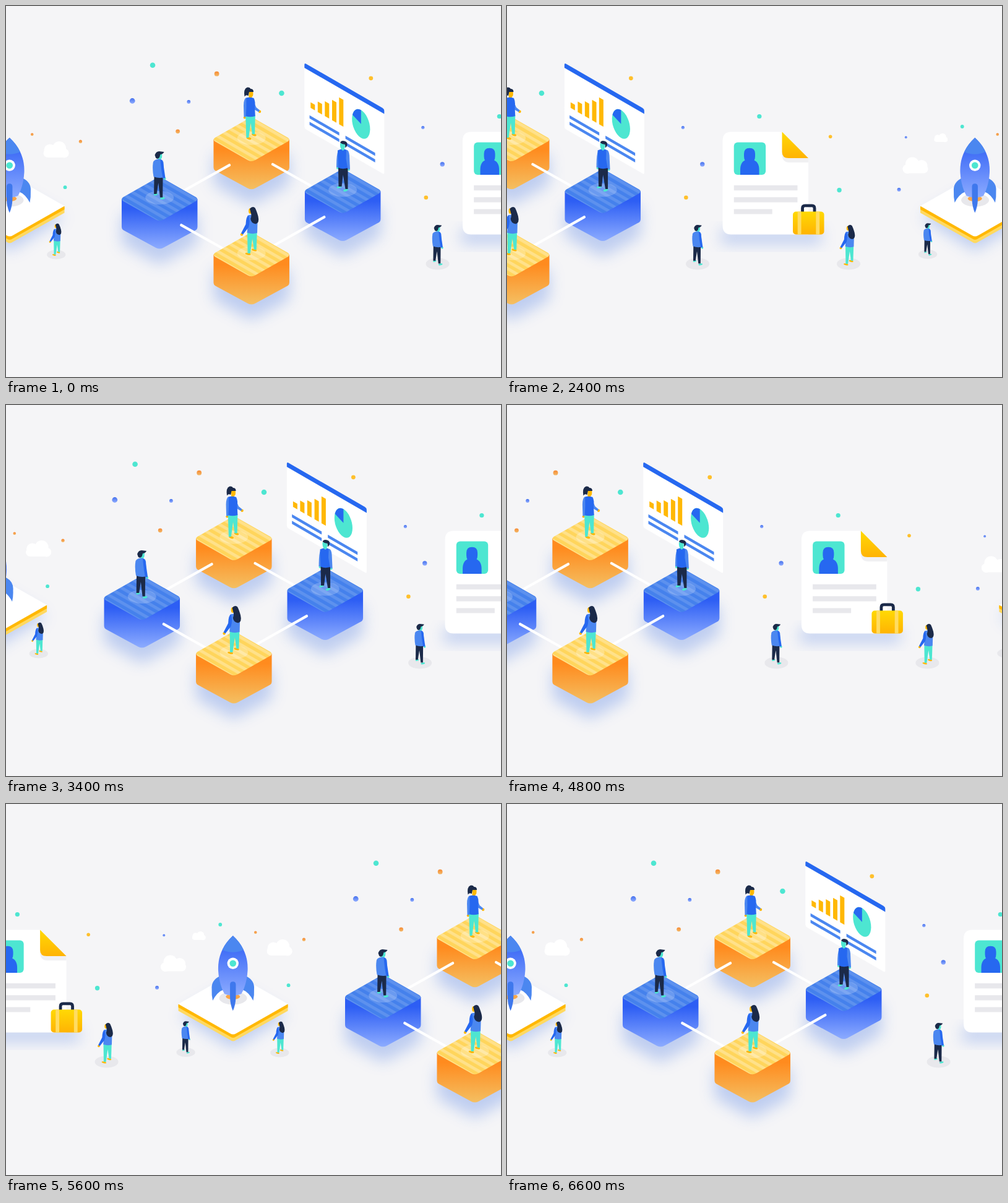
These frames come from a looping animation (800 px wide and 600 px high, 7600 ms). An HTML page:

```html
<!DOCTYPE html>
<html lang="en">
<head>
<meta charset="utf-8">
<title>Sliding isometric strip</title>
<style>
  html, body { margin: 0; width: 100%; height: 100%; overflow: hidden; background: #f5f5f7; }
  svg { display: block; width: 100%; height: 100%; }
  .blue { fill: #2668f0; }
  .sky { fill: #4b87f0; }
  .teal { fill: #4de6d1; }
  .navy { fill: #1b2a49; }
  .gold { fill: #ffb804; }
  .white { fill: #fff; }
  .grey { fill: #e8e8ec; }
  .link { stroke: #fff; stroke-width: 4.2; stroke-linecap: round; }
  .shadow { fill: #5d87e4; opacity: .36; }
</style>
</head>
<body>
<svg viewBox="0 0 800 600">
<defs>
  <linearGradient id="blueFade" x2="0" y2="1"><stop stop-color="#2a5bf4"/><stop offset="1" stop-color="#8cabff"/></linearGradient>
  <linearGradient id="cubeBlue" x2="0" y2="1"><stop offset=".2" stop-color="#2d5ef4"/><stop offset="1" stop-color="#8cabff"/></linearGradient>
  <linearGradient id="cubeOrange" x2="0" y2="1"><stop offset=".2" stop-color="#ff8b1e"/><stop offset="1" stop-color="#f4bf62"/></linearGradient>
  <linearGradient id="dotBlue" x2="0" y2="1"><stop stop-color="#4672ee"/><stop offset="1" stop-color="#91adff"/></linearGradient>
  <linearGradient id="dotOrange" x2="0" y2="1"><stop stop-color="#f78a33"/><stop offset="1" stop-color="#f3b969"/></linearGradient>
  <linearGradient id="yellow" x2="0" y2="1"><stop stop-color="#ffd904"/><stop offset="1" stop-color="#ffb304"/></linearGradient>
  <pattern id="stripes" width="20" height="11.8" patternUnits="userSpaceOnUse" patternTransform="skewY(30)">
    <rect width="20" height="5.6" fill="#fff"/>
  </pattern>
  <filter id="blur" x="-60%" y="-60%" width="220%" height="220%"><feGaussianBlur stdDeviation="12"/></filter>

  <path id="cubeTop" d="M-59-2.8L-5-33.5Q0-36.5 5-33.5L59-2.8Q63 .3 59 3.4L6 33.5Q0 37 -6 33.5L-59 3.4Q-63 .3 -59-2.8Z"/>
  <path id="cubeBody" d="M-61.25 0V45Q-61.25 49 -58 50.8L-6 79Q0 82 6 79L58 50.8Q61.25 49 61.25 45V0Z"/>
  <g id="cubeShadow" class="shadow" filter="url(#blur)"><use href="#cubeBody" y="24"/></g>
  <g id="cubeLid">
    <use href="#cubeTop"/>
    <use href="#cubeTop" style="fill:url(#stripes)" opacity=".17"/>
  </g>
  <g id="blueCube">
    <use href="#cubeShadow"/>
    <use href="#cubeBody" fill="url(#cubeBlue)"/>
    <use href="#cubeTop" fill="#4581ec"/>
    <use href="#cubeTop" fill="url(#stripes)" opacity=".13"/>
    <ellipse cy="-2" rx="23" ry="11" fill="#fff" opacity=".2"/>
  </g>
  <g id="orangeCube">
    <use href="#cubeShadow"/>
    <use href="#cubeBody" fill="url(#cubeOrange)"/>
    <use href="#cubeTop" fill="#ffd55c"/>
    <use href="#cubeTop" fill="url(#stripes)" opacity=".28"/>
    <ellipse cy="-2" rx="23" ry="11" fill="#fff" opacity=".25"/>
  </g>

  <!-- People stand with the origin at the centre of their ground spot -->
  <ellipse id="ground" rx="22.6" ry="11.3" class="grey"/>
  <g id="man">
    <g class="teal">
      <ellipse cx="-5.5" cy="-5.3" rx="3.4" ry="1.6" transform="rotate(-15 -5.5 -5.3)"/>
      <ellipse cx="5.5" cy="1" rx="4" ry="1.7" transform="rotate(-12 5.5 1)"/>
      <path d="M0-71H4.5Q5.5-64 2.5-62L1-59H-3Z"/>
      <circle cx="9" cy="-31" r="2"/>
    </g>
    <path class="navy" d="M-8-36L6-34L5.7-.5H1.5L-1.2-24L-4-6H-8.4Z"/>
    <path class="sky" d="M-9.5-58Q-7-62.5 0-62.5Q6-62 7-57L8-33Q0-30.5 -9-34Q-11.5-48 -9.5-58Z"/>
    <path class="blue" d="M2-61.8Q5.5-61.5 6.5-56L10-32L6.2-31Q3-45 2-61.8Z"/>
    <path class="navy" d="M-7-69Q-5-75 0-75L8-74Q6-70 2-70L.5-65Q-3-61.5 -5.5-64.5Z"/>
  </g>
  <g id="woman">
    <g class="gold">
      <ellipse cx="-5" cy="1" rx="4.5" ry="1.7" transform="rotate(12 -5 1)"/>
      <ellipse cx="5" cy="-5.3" rx="4.2" ry="1.7" transform="rotate(15 5 -5.3)"/>
      <ellipse cx="-1.2" cy="-68.5" rx="2.7" ry="4.5"/>
      <circle cx="-15" cy="-30.5" r="2.2"/>
    </g>
    <path class="teal" d="M-6-34H9.7L8.8-6H4.8L2.2-24L-1.2 0H-5.5Z"/>
    <path class="sky" d="M-5.5-61Q0-63.5 5-61L10.5-50L10-33Q2-30.5 -6.5-33.5L-5-47Z"/>
    <path class="blue" d="M-4-61.5Q-8-60 -8.5-47L-16-32.5L-13-30.5L-4-42Q-1-52 -4-61.5Z"/>
    <path class="navy" d="M-2-72Q2-77 6.5-73.5Q9-69 11.5-60Q14-49 7.5-47.5Q0-48.5 -.8-56Q1.5-61 -.5-66Z"/>
  </g>
  <g id="presenter">
    <g class="gold">
      <ellipse cx="-4" cy="1" rx="4" ry="1.8" transform="rotate(18 -4 1)"/>
      <ellipse cx="4.3" cy="-4.7" rx="4" ry="1.8" transform="rotate(18 4.3 -4.7)"/>
      <path d="M-4-76H2.5Q4-67 .8-66V-61H-4Z"/>
      <circle cx="-10.7" cy="-32.5" r="2.1"/><circle cx="13.5" cy="-42.3" r="2.2"/>
    </g>
    <path class="teal" d="M-9.3-36H6.3L5.6-5.5H1.4L-1-24L-4.2 0H-8.2Z"/>
    <path class="sky" d="M4-58L8-49L13.5-44.5L12-41.5L4-46Z"/>
    <path class="blue" d="M-9.5-64Q-3-66.5 4-64Q7-58 5.5-50L6.3-35Q-2-32.5 -9.5-35Z"/>
    <path class="sky" d="M-8.3-64.5Q-12.5-63 -12.5-52L-12-33.5H-8.8L-8-50Z"/>
    <path class="navy" d="M-11-66.5Q-13-79 -7-81.3Q-3-82 -1-79Q3.5-79 3.5-74H-3.5L-5-67.5Q-8-70.5 -11-66.5Z"/>
  </g>
  <g id="analyst">
    <g class="teal">
      <ellipse cx="-5" cy="-4.3" rx="4" ry="1.8" transform="rotate(-18 -5 -4.3)"/>
      <ellipse cx="5.5" cy="1" rx="4" ry="1.8" transform="rotate(-18 5.5 1)"/>
      <path d="M-3.5-75H4Q5-68 3.5-67V-63L-1-62L-2-66Q-4-69 -3.5-75Z"/>
      <circle cx="-7.5" cy="-35" r="2"/><circle cx="10.5" cy="-32.5" r="2"/>
    </g>
    <path class="navy" d="M-6.5-36H9L9 -1H5L1.2-24L-1-5H-6Z"/>
    <path class="sky" d="M-7-62Q-9.5-56 -9.5-36H-6L-4-52Z"/>
    <path class="blue" d="M-7.5-63.5L-2-65.5L1-63L4-65.5L9-63V-35Q0-32.5 -6.5-35.5Z"/>
    <path class="sky" d="M6.5-64.5Q11-64 11.5-55L12.5-33H9L6-50Z"/>
    <path class="navy" d="M-3.5-76Q-2-80 3-78.8Q8-78 8-73Q7.5-69 5-67.5L4.5-73Q0-73 -3.5-76Z"/>
  </g>

  <g id="cloud" class="white">
    <rect x="-20.5" y="-2" width="41" height="14" rx="7"/>
    <circle cx="-10" cy="0" r="9.5"/><circle cx="5" cy="-3" r="11"/><circle cx="13" cy="5" r="7.5"/>
  </g>

  <g id="network">
    <circle cx="237" cy="95.7" r="4.3" class="teal"/><circle cx="445.4" cy="141" r="4.3" class="teal"/>
    <circle cx="204.2" cy="153.5" r="4.4" fill="url(#dotBlue)"/><circle cx="295.3" cy="155" r="2.9" fill="url(#dotBlue)"/>
    <circle cx="340.6" cy="109.7" r="3.9" fill="url(#dotOrange)"/><circle cx="277.6" cy="202.8" r="3.4" fill="url(#dotOrange)"/>
    <circle cx="589.8" cy="116.8" r="3.4" fill="#ffc02c"/>

    <g transform="translate(482.3 92) skewY(30)">
      <rect width="129" height="106" rx="3" class="white"/>
      <path class="blue" d="M0 8V3Q0 0 3 0H126Q129 0 129 3V8Z"/>
      <path class="gold" d="M10 58h7v9h-7zM21.5 50h7v17h-7zM33 43h7v24h-7zM44.7 34h7v33h-7zM56 23.5h7v43.5h-7z"/>
      <path class="sky" d="M8.3 80h48v5h-48zM8.3 90.5h48v5h-48zM66.3 79.5h48v5h-48zM66.3 90h48v5h-48z"/>
      <g transform="translate(91.5 46)">
        <ellipse rx="14.6" ry="22.5" class="teal"/>
        <path class="blue" d="M0 0V-22.5A14.6 22.5 0 0 0 -13.8-6.9Z"/>
      </g>
    </g>

    <use href="#orangeCube" x="396.7" y="215.7"/>
    <path class="link" d="M361 257.3L285 300M431 256L495 292"/>
    <use href="#blueCube" x="248.2" y="312"/>
    <use href="#blueCube" x="544.2" y="299.5"/>
    <path class="link" d="M283.3 354.3L352 393M514.3 341.3L430 389"/>
    <use href="#orangeCube" x="396.7" y="402"/>
    <use href="#presenter" x="396.5" y="213"/>
    <use href="#man" x="247.5" y="310"/>
    <use href="#analyst" x="543.5" y="297"/>
    <use href="#woman" x="396" y="400"/>
  </g>

  <g id="profile">
    <circle cx="284.3" cy="196.6" r="2.6" fill="url(#dotBlue)"/><circle cx="315.7" cy="256" r="3.7" fill="url(#dotBlue)"/>
    <circle cx="407.8" cy="178.5" r="3.6" class="teal"/><circle cx="537" cy="297.7" r="3.7" class="teal"/>
    <circle cx="522.6" cy="211.3" r="2.8" fill="#ffc02c"/><circle cx="289.3" cy="309.8" r="3.3" fill="#ffc02c"/>

    <rect x="346" y="362" width="162" height="22" class="shadow" filter="url(#blur)"/>
    <path class="white" d="M362.5 203.5H444.5L487 246V369.5H362.5Q348.5 369.5 348.5 355.5V217.5Q348.5 203.5 362.5 203.5Z"/>
    <path d="M444.5 236V241Q445 253 456 253H487V246Z" fill="#f0f0f2"/>
    <path d="M444.5 203.5L487 246H455Q444.5 246 444.5 236Z" fill="url(#yellow)"/>
    <rect x="366.7" y="220.6" width="51.4" height="52.4" rx="6" class="teal"/>
    <path class="blue" d="M383 239Q383 229.7 392 229.7T401 239V243Q401 247 399.5 249.5Q407.5 253 407.5 265V273H377V265Q377 253 384.5 249.5Q383 247 383 243Z"/>
    <path class="grey" d="M366.7 290h102.7v8.2h-102.7zM366.7 309.2h102.7v8.2h-102.7zM366.7 328.4h62v8.2h-62z"/>
    <path d="M477.5 335V327Q477.5 322.8 481.5 322.8H493Q497 322.8 497 327V335" fill="none" stroke="#1b2a49" stroke-width="4.8"/>
    <rect x="462" y="332.5" width="50.5" height="37" rx="5" fill="url(#yellow)"/>
    <path d="M469.7 332.5h5.8v37h-5.8zM499.3 332.5h5.8v37h-5.8z" fill="#ffdc62"/>

    <g transform="translate(308 417) scale(.84)"><use href="#ground"/><use href="#man"/></g>
    <g transform="translate(552 417) scale(.84)"><use href="#ground"/><use href="#woman"/></g>
  </g>

  <g id="launch">
    <circle cx="333.2" cy="212.5" r="2" fill="url(#dotBlue)"/><circle cx="322" cy="297" r="3" fill="url(#dotBlue)"/>
    <circle cx="424.2" cy="195" r="2.9" class="teal"/><circle cx="534.5" cy="293.2" r="2.9" class="teal"/>
    <circle cx="481.2" cy="207.8" r="2.3" fill="url(#dotOrange)"/><circle cx="559.4" cy="219.2" r="2.6" fill="url(#dotOrange)"/>
    <use href="#cloud" transform="translate(520 233)"/>
    <use href="#cloud" transform="translate(348.5 258.5) scale(-1 1)"/>
    <use href="#cloud" transform="translate(389.7 213.3) scale(.53)"/>

    <path class="shadow" filter="url(#blur)" d="M358 342L445 292L532 342L445 396Z"/>
    <path d="M356.5 324H533.5V334.5L450 381.5Q445 385.5 440 381.5L356.5 334.5Z" fill="#ffd961"/>
    <path class="gold" d="M356.5 324H533.5V329L450 376Q445 380 440 376L356.5 329Z"/>
    <path class="white" d="M356.5 323.5L440 276Q445 273 450 276L533.5 323.5L450 371Q445 374 440 371Z"/>
    <ellipse cx="445" cy="314" rx="22.5" ry="10.5" class="grey"/>
    <ellipse cx="444.7" cy="311.5" rx="11.5" ry="4.6" fill="#f9a74a"/>
    <g id="fin"><path class="sky" d="M424 278Q409 285 410.5 300Q410 309 412 318Q419 304 430 300Z"/></g>
    <use href="#fin" transform="translate(889.4) scale(-1 1)"/>
    <path d="M444.7 213C425 231 420 252 421 270C422 287 427 300 431 307Q444.7 313 458.4 307C462.4 300 467.4 287 468.4 270C469.4 252 464.4 231 444.7 213Z" fill="url(#blueFade)"/>
    <path class="sky" d="M444.7 213Q433 223.5 427.6 236Q444.7 243.5 461.8 236Q456.4 223.5 444.7 213Z"/>
    <circle cx="444.7" cy="257.7" r="9.2" class="white"/><circle cx="444.7" cy="257.7" r="5.3" class="teal"/>
    <path d="M440 292Q440 287.3 444.7 287.3T449.4 292V313Q449 325 444.7 334.5Q440.4 325 440 313Z" fill="#3e78ed"/>

    <g transform="translate(368.5 401.5) scale(.67)"><use href="#ground"/><use href="#man"/></g>
    <g transform="translate(520.2 402) scale(.67)"><use href="#ground"/><use href="#woman"/></g>
  </g>

  <g id="panorama">
    <use href="#network"/>
    <use href="#profile" x="389.5"/>
    <use href="#launch" x="701"/>
  </g>
</defs>
<g id="strip">
  <use href="#panorama" x="-1140"/>
  <use href="#panorama"/>
  <use href="#panorama" x="1140"/>
</g>
</svg>
<script>
  const LOOP = 7600, STEP = 100, STEPS = 19, TRAVEL = 1480;
  const LEAVE = 2000, RETURN = 4800;
  const strip = document.getElementById('strip');

  // Number of scroll steps taken since a slide began.
  const stepsSince = (time, start) =>
    Math.max(0, Math.min(STEPS, Math.floor((time - start) / STEP) + 1));

  function draw(now) {
    const time = now % LOOP;
    const steps = stepsSince(time, LEAVE) - stepsSince(time, RETURN);
    strip.setAttribute('transform', `translate(${-TRAVEL * steps / STEPS} 0)`);
    requestAnimationFrame(draw);
  }
  draw(performance.now());
</script>
</body>
</html>
```
